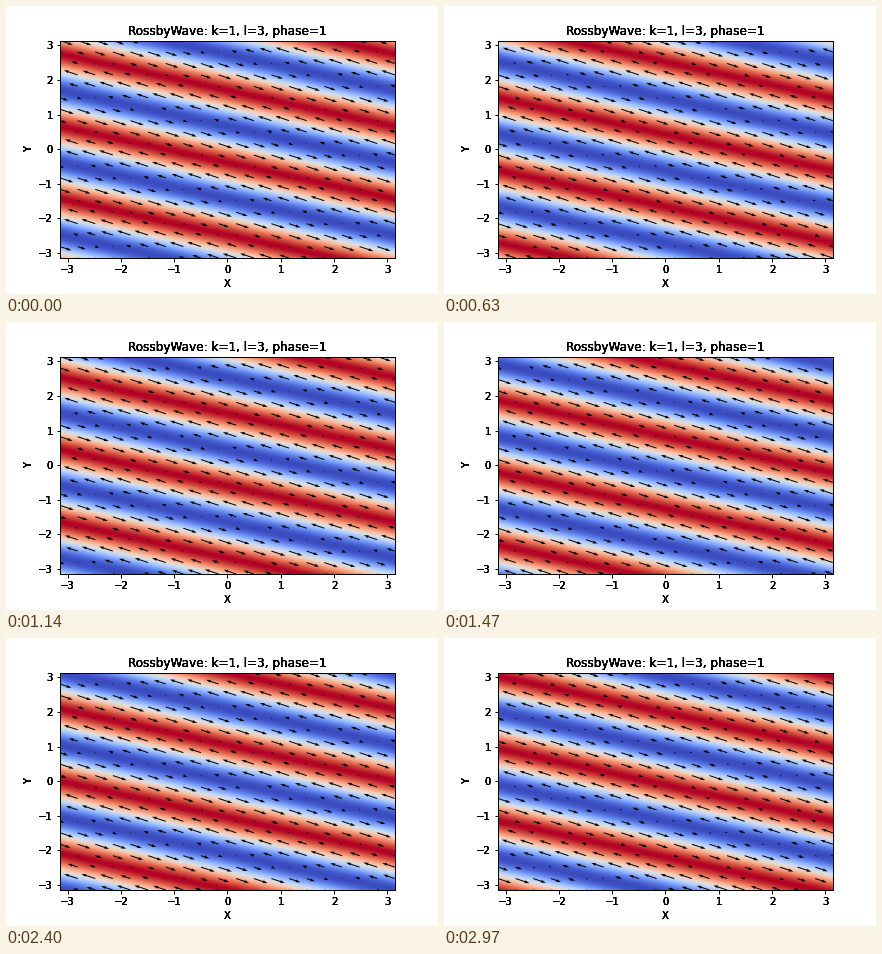
Animation of 432 by 288 pixels, one loop 3 s. Source, as a matplotlib script:

```python
import numpy as np
import matplotlib.pyplot as plt
from matplotlib.animation import FuncAnimation

FRAMES, INTERVAL = 100, 30
K, L, PHASE = 1, 3, 1
BETA = 2.0
OMEGA = -BETA * K / (K**2 + L**2 + 1)

plt.rcParams.update({
    "font.family": "DejaVu Sans",
    "font.size": 10,
    "axes.linewidth": 1,
    "xtick.major.width": 1,
    "ytick.major.width": 1,
})


def grid(nx, ny):
    return np.meshgrid(np.linspace(-np.pi, np.pi, nx),
                       np.linspace(-np.pi, np.pi, ny))


def angle(x, y, t):
    return K * x + L * y - OMEGA * t + PHASE


def stream(x, y, t):
    return np.cos(angle(x, y, t))


def velocity(x, y, t):
    s = np.sin(angle(x, y, t))
    return L * s, -K * s


def harden(text, passes=5):
    """Overdraw a text so its soft edges turn solid."""
    draw = text.draw

    def repeat(renderer):
        for _ in range(passes):
            draw(renderer)

    text.draw = repeat


fig, ax = plt.subplots(figsize=(6, 4), dpi=72)
fig.subplots_adjust(left=0.125, right=0.9, bottom=0.125, top=0.88)

X, Y = grid(336, 218)
QX, QY = grid(20, 20)

image = ax.imshow(stream(X, Y, 1), cmap="coolwarm", vmin=-1, vmax=1,
                  origin="lower", aspect="auto", interpolation="bilinear",
                  extent=(-np.pi, np.pi, -np.pi, np.pi))
arrows = ax.quiver(QX, QY, *velocity(QX, QY, 1))

ax.set(xlim=(-np.pi, np.pi), ylim=(-np.pi, np.pi),
       xticks=range(-3, 4), yticks=range(-3, 4), xlabel="X", ylabel="Y",
       title=f"RossbyWave: k={K}, l={L}, phase={PHASE}")

for text in [ax.title, ax.xaxis.label, ax.yaxis.label,
             *ax.get_xticklabels(), *ax.get_yticklabels()]:
    harden(text)


def update(i):
    t = i + 1
    image.set_data(stream(X, Y, t))
    arrows.set_UVC(*velocity(QX, QY, t))
    return image, arrows


anim = FuncAnimation(fig, update, frames=FRAMES, interval=INTERVAL,
                     repeat=True, blit=False)
plt.show()
```
